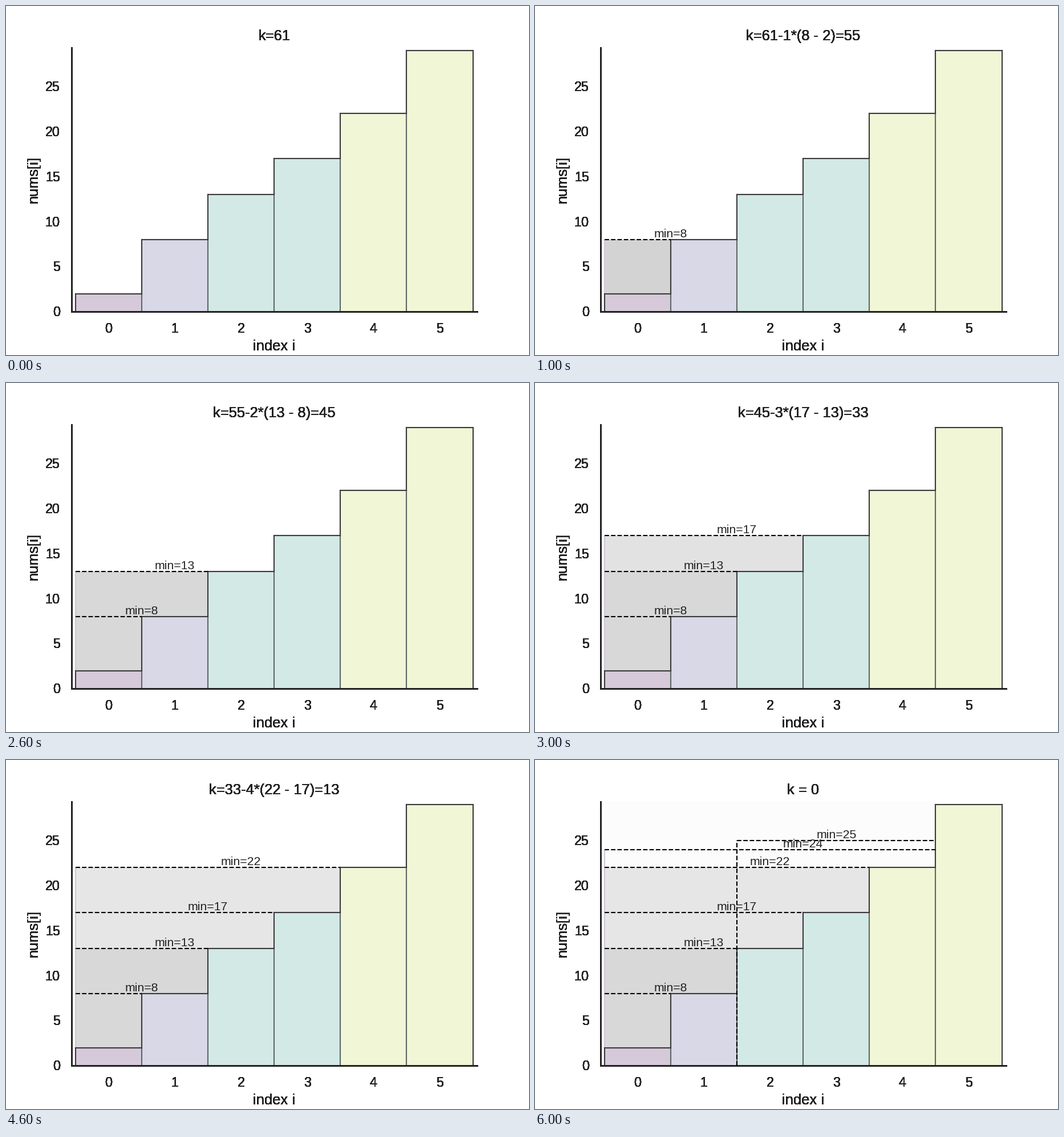
Recreate the animation shown at these times as a matplotlib script. Size 917x611 px, loop 7 s.

```python
import matplotlib.pyplot as plt
from matplotlib.animation import FuncAnimation
from matplotlib.patches import Rectangle

W, H, DPI = 917, 611, 100
INK, EDGE, SHARED = "#222222", "#3a3a3c", "#5f6865"

NUMS = [2, 8, 13, 17, 22, 29]
BARS = ["#d6c9d9", "#d9d8e7", "#d3e9e5", "#d3e9e5", "#f1f6d6", "#f1f6d6"]
LEVELS = [8, 13, 17, 22, 24]
FRESH = ["#d3d3d3", "#d8d8d8", "#e2e2e2", "#e6e6e6", "#fcfcfc"]
SETTLED = ["#d8d8d8", "#d8d8d8", "#e6e6e6", "#e6e6e6", "#fcfcfc"]
LEFT, RIGHT, TOP, BOTTOM = 115.0, 825.5, 73.3, 535.1

plt.rcParams["font.family"] = "Liberation Sans"
fig = plt.figure(figsize=(W / DPI, H / DPI), dpi=DPI, facecolor="white")
ax = fig.add_axes([0, 0, 1, 1])
ax.set_xlim(0, W)
ax.set_ylim(H, 0)
ax.axis("off")


def pt(px):
    return px * 72 / DPI


def X(i):
    return 179.9 + i * 116.13


def Y(v):
    return BOTTOM - 15.76 * v


def line(x0, y0, x1, y1, color=EDGE, width=2.12, z=3, **kw):
    kw.setdefault("solid_capstyle", "projecting")
    return ax.plot([x0, x1], [y0, y1], color=color, lw=pt(width), zorder=z, **kw)[0]


def dashed(x0, y0, x1, y1):
    return line(x0, y0, x1, y1, "black", z=5, ls="--")


def rect(x0, y0, x1, y1, color, z):
    return ax.add_patch(Rectangle((x0, y0), x1 - x0, y1 - y0, fc=color, lw=0, zorder=z))


def label(x, y, text, size, layers=8, ha="center", va="baseline", **kw):
    """Stacked layers give the text firmer edges."""
    return [ax.text(x, y, text, size=pt(size), color=INK, ha=ha, va=va,
                    zorder=6, **kw) for _ in range(layers)]


def draw_bars():
    for i, (n, color) in enumerate(zip(NUMS, BARS)):
        x0, x1 = X(i - 0.5), X(i + 0.5)
        below = NUMS[i - 1] if i else 0
        rect(x0, Y(n), x1, BOTTOM, color, 2)
        if i:
            line(x0, BOTTOM, x0, Y(below), SHARED)
        line(x0, Y(below), x0, Y(n))
        line(x0, Y(n), x1, Y(n))
    line(x1, BOTTOM, x1, Y(NUMS[-1]))


def draw_axes():
    line(LEFT, TOP, LEFT, BOTTOM, INK, 3, 4)
    line(LEFT, BOTTOM, RIGHT, BOTTOM, INK, 3, 4)
    for i in range(len(NUMS)):
        label(X(i), 572, str(i), 23.35)
    for v in range(0, 30, 5):
        label(94.8, Y(v) + 8, str(v), 23.35, ha="right")
    label(470, 603.2, "index i", 25.47)
    label(55, 304.3, "nums[i]", 25.47, rotation=90, rotation_mode="anchor")


def min_label(x, v):
    return label(x, Y(v), f"min={v}", 21.23, layers=1, va="bottom")


def make_titles():
    k, texts = 61, ["k=61"]
    for i in range(1, 5):
        hi, lo = NUMS[i], NUMS[i - 1]
        left = k - i * (hi - lo)
        texts.append(f"k={k}-{i}*({hi} - {lo})={left}")
        k = left
    return texts + ["k = 3", "k = 0"]


draw_bars()
draw_axes()
titles = make_titles()
title = label(470, 60.3, "", 25.47)

# One shaded band, dashed line and label per raised minimum.
x_left = X(-0.5)
bands, steps = [], []
for n, level in enumerate(LEVELS, 1):
    x_end = X(n - 0.5)
    top = TOP if n == 5 else Y(level)
    bands.append(rect(x_left, top, x_end, Y(NUMS[n - 1]), FRESH[n - 1], 1))
    steps.append([bands[-1], dashed(x_left, Y(level), x_end, Y(level))]
                 + min_label(X(n / 2), level))
steps.append([dashed(X(1.5), BOTTOM, X(1.5), Y(25)),
              dashed(X(1.5), Y(25), X(4.5), Y(25))] + min_label(X(3), 25))
side = line(x_left, Y(2), x_left, Y(2), "#cfc6d6", 2.12, 1.5, solid_capstyle="butt")


def update(frame):
    for t in title:
        t.set_text(titles[frame])
    for n, step in enumerate(steps, 1):
        for artist in step:
            artist.set_visible(n <= frame)
    for n, band in enumerate(bands, 1):
        band.set_facecolor((FRESH if n == frame else SETTLED)[n - 1])
    side.set_visible(frame > 0)
    side.set_ydata([Y(2), Y(LEVELS[min(max(frame, 1), 5) - 1])])
    return []


anim = FuncAnimation(fig, update, frames=7, interval=1000, repeat=True, repeat_delay=0)
plt.show()
```
